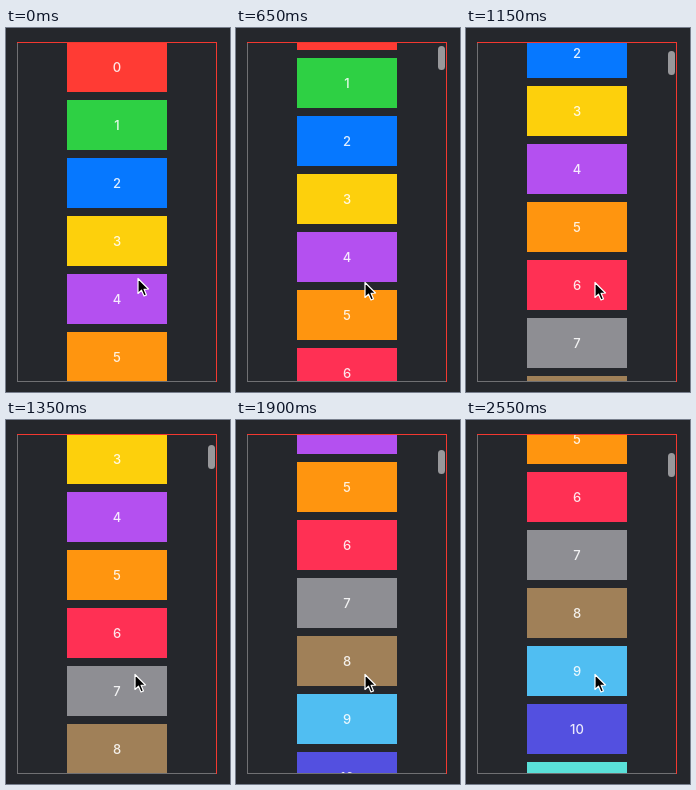
Write an HTML page with a canvas that moves like this. It is 224 px wide and 364 px high and loops after 2600 ms.

```html
<!DOCTYPE html>
<html lang="en">
<head>
<meta charset="utf-8">
<title>Scrolling list</title>
<style>
  html, body { margin: 0; width: 100%; height: 100%; overflow: hidden; background: #25272c; }
  canvas { display: block; width: 224px; height: 364px; }
</style>
</head>
<body>
<canvas id="stage" width="224" height="364"></canvas>
<script>
const ctx = document.getElementById('stage').getContext('2d');
const LOOP = 2600, STEP = 50;
const VIEW = { x: 11, y: 14, w: 200, h: 340 };
const ITEM = { x: 61, w: 100, h: 50, pitch: 58 };
const COLORS = ['#ff3b34', '#2ed044', '#0678ff', '#fdd00c', '#b450f0', '#ff950f',
  '#ff3054', '#8e8e93', '#a08058', '#50bef2', '#5350e0', '#5ae0d8'];

// Scroll keys: time in ms, offset in px, speed in px/s
const SCROLL = [[100, 0, 0], [350, 6, 70], [850, 75, 165], [1150, 130, 200],
  [1550, 217, 185], [1900, 262, 115], [2250, 299, 62], [2550, 310, 12]];

function scrollAt(t) {
  if (t <= SCROLL[0][0]) return 0;
  const i = Math.max(1, SCROLL.findIndex(key => t <= key[0]));
  const [t0, s0, v0] = SCROLL[i - 1], [t1, s1, v1] = SCROLL[i];
  const d = t1 - t0, u = (t - t0) / d, w = 1 - u;
  return w * w * (1 + 2 * u) * s0 + u * u * (3 - 2 * u) * s1
    + u * w * (w * v0 - u * v1) * d / 1000;
}

function fill(color, x, y, w, h) {
  ctx.fillStyle = color;
  ctx.fillRect(x, y, w, h);
}

function drawItems(offset) {
  ctx.save();
  ctx.beginPath();
  ctx.rect(VIEW.x, VIEW.y, VIEW.w, VIEW.h);
  ctx.clip();
  ctx.font = '500 13px Inter, sans-serif';
  ctx.textAlign = 'center';
  COLORS.forEach((color, i) => {
    const y = VIEW.y + i * ITEM.pitch - offset;
    fill(color, ITEM.x, y, ITEM.w, ITEM.h);
    ctx.fillStyle = 'rgba(255,255,255,.88)';
    ctx.fillText(i, ITEM.x + ITEM.w / 2, y + 30);
  });
  ctx.restore();
}

function drawBorder() {
  const { x, y, w, h } = VIEW, dim = '#707073', red = '#f33830';
  fill(dim, x, y, 1, h);
  fill(dim, x, y + h - 1, w, 1);
  fill(red, x, y, w, 1);
  fill(red, x + w - 1, y, 1, h);
}

function drawThumb(offset) {
  if (offset < 1) return;
  ctx.fillStyle = '#98989b';
  ctx.beginPath();
  ctx.roundRect(202, Math.round(15.8 + offset * 0.055), 7, 24, 3.5);
  ctx.fill();
}

function drawCursor(t) {
  const u = Math.min(1, t / 700);
  ctx.save();
  ctx.translate(Math.round(131 - 3 * u) + 0.5, Math.round(250 + 4 * u) + 0.5);
  ctx.beginPath();
  ctx.moveTo(0.5, 0);
  for (const [x, y] of [[0.5, 15], [4, 11.7], [6.5, 17.5], [9, 16.4], [6.6, 10.8], [11, 10.5]]) ctx.lineTo(x, y);
  ctx.closePath();
  ctx.fillStyle = '#000';
  ctx.strokeStyle = '#fff';
  ctx.lineWidth = 1.2;
  ctx.lineJoin = 'round';
  ctx.fill();
  ctx.stroke();
  ctx.restore();
}

function draw(t) {
  const offset = Math.round(scrollAt(t));
  fill('#25272c', 0, 0, 224, 364);
  drawItems(offset);
  drawBorder();
  drawThumb(offset);
  drawCursor(t);
}

const start = performance.now();
function tick() {
  const t = (performance.now() - start) % LOOP;
  draw(Math.floor(t / STEP) * STEP);
  requestAnimationFrame(tick);
}
tick();
</script>
</body>
</html>
```
